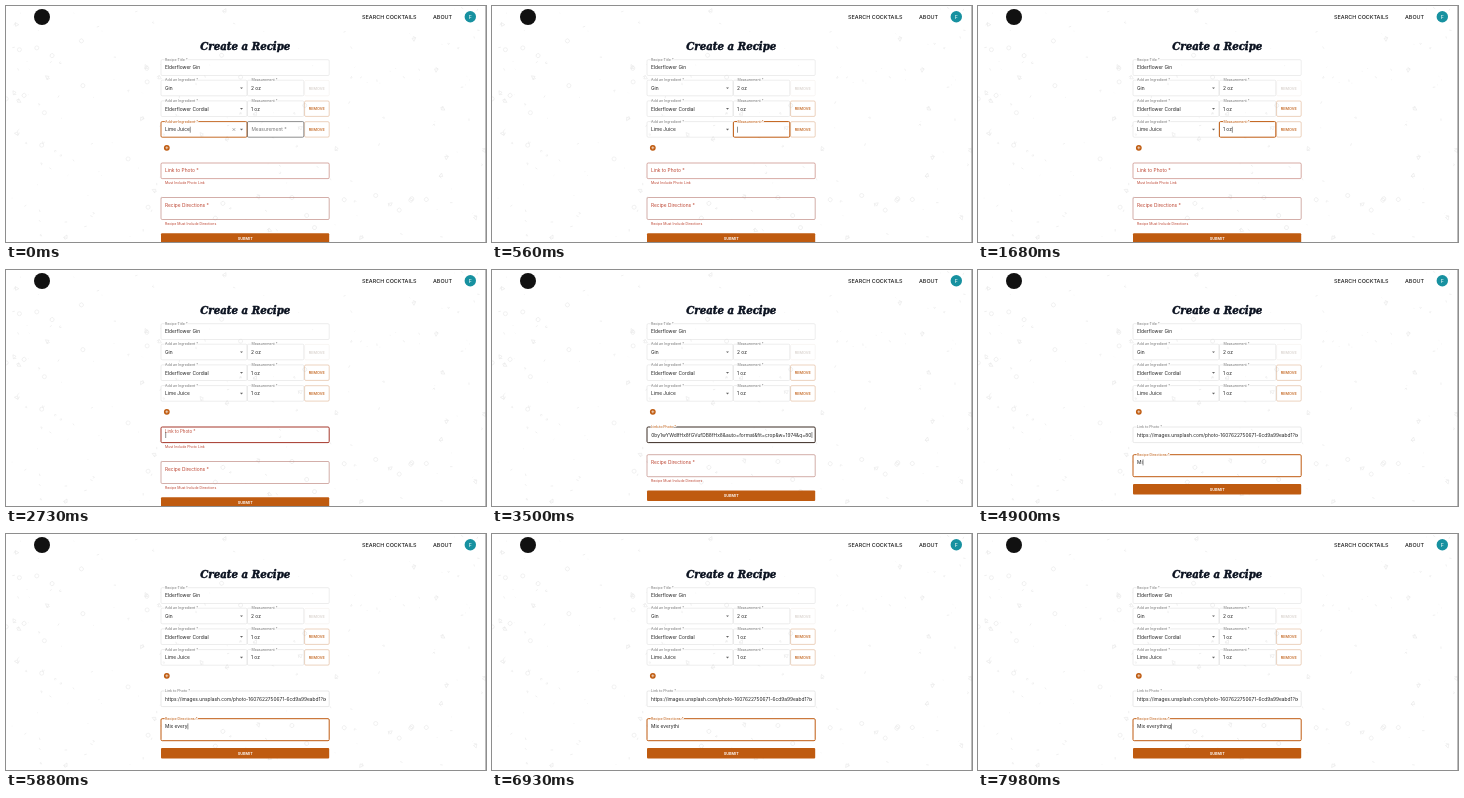
Recreate the animation shown at these times as an HTML page. Size 480x236 px, loop 8000 ms.

```html
<!DOCTYPE html>
<html lang="en">
<head>
<meta charset="utf-8">
<title>Create a Recipe</title>
<style>
  html, body { margin: 0; width: 100%; height: 100%; overflow: hidden; background: #fff; }
  svg { display: block; width: 100vw; height: 100vh; }
  text { font-family: Inter, "Open Sans", sans-serif; white-space: pre; }
  .heading { font-family: "DejaVu Serif", "Noto Serif", serif; font-weight: bold; font-style: italic; }
</style>
</head>
<body>
<svg viewBox="0 0 480 236" xmlns="http://www.w3.org/2000/svg">
  <defs><clipPath id="linkClip"><rect x="159" y="158" width="161" height="14"/></clipPath></defs>
  <g id="backdrop"></g>
  <g id="page"></g>
  <g id="form"></g>
</svg>
<script>
const LOOP = 8000;
const ORANGE = '#bf5b10', RED = '#bd4633', INK = '#222', GREY = '#777', LINE = '#dadada';
const BODY = 4.85, SMALL = 3.6;

const URL_START = 'https://images.unsplash.com/photo-1607622750671-6cd9a99eabd1?ixlib=rb';
const URL_END = 'MHxwaG90by1wYWdlfHx8fGVufDB8fHx8&auto=format&fit=crop&w=1974&q=80';

// When each field takes the focus, and what has been typed by when.
const FOCUS = { measure: 140, link: 2650, directions: 4040 };
const PASTE = 3500;
const MEASURE = [[1050, '1'], [1190, '1 '], [1400, '1 o'], [1540, '1 oz']];
const DIRECTIONS = [
  [4760, 'M'], [4870, 'Mi'], [4980, 'Mix'], [5080, 'Mix '], [5200, 'Mix e'],
  [5390, 'Mix ev'], [5530, 'Mix eve'], [5740, 'Mix ever'], [5880, 'Mix every'],
  [6090, 'Mix everyt'], [6230, 'Mix everyth'], [6370, 'Mix everythi'],
  [7210, 'Mix everythin'], [7980, 'Mix everything']
];
const INPUT_TIMES = [0, ...Object.values(FOCUS), PASTE,
  ...MEASURE.map(e => e[0]), ...DIRECTIONS.map(e => e[0])].sort((a, b) => a - b);

const $ = id => document.getElementById(id);
const pen = document.createElement('canvas').getContext('2d');
pen.font = '100px Inter, "Open Sans", sans-serif';
const widthOf = (s, size = BODY) => pen.measureText(s).width * size / 100;

const lastBefore = (list, t, none) => list.reduce((found, [at, v]) => at <= t ? v : found, none);
const esc = s => s.replace(/&/g, '&amp;');

function text(s, x, y, { size = BODY, fill = INK, anchor = 'start', weight = 400, extra = '' } = {}) {
  return `<text x="${x}" y="${(y + size * .36).toFixed(2)}" font-size="${size.toFixed(2)}" fill="${fill}" ` +
    `text-anchor="${anchor}" font-weight="${weight}" ${extra}>${esc(s)}</text>`;
}

function box(x, y, w, h, stroke = LINE, width = .5, fill = 'none') {
  return `<rect x="${x}" y="${y}" width="${w}" height="${h}" rx="1.2" fill="${fill}" stroke="${stroke}" stroke-width="${width}"/>`;
}

// Floating label: raised 0 rests inside the field, 1 sits on its top border.
function label(s, x, top, raised = 1, fill = GREY) {
  const size = BODY + (SMALL - BODY) * raised;
  const gap = raised > .3 ? 'stroke="#fff" stroke-width="1.4" paint-order="stroke"' : '';
  return text(s, x, top + 7.6 - 8 * raised, { size, fill, extra: gap });
}

const arrow = y => `<path d="M234 ${y - .8}h3l-1.5 1.7z" fill="#666"/>`;
const caret = (x, y) => `<path d="M${(x + .5).toFixed(2)} ${y - 3}v6" stroke="${INK}" stroke-width=".5"/>`;

function ingredient(name, top, focused) {
  return box(155, top, 86, 15.6, focused ? ORANGE : LINE, focused ? .9 : .5) +
    label('Add an Ingredient *', 159, top, 1, focused ? ORANGE : GREY) +
    text(name, 159, top + 8.1) + arrow(top + 8);
}

function measurement(amount, top, { stroke = LINE, width = .5, raised = 1, fill = GREY } = {}) {
  return box(241.4, top, 56.4, 15.6, stroke, width) +
    label('Measurement *', 245.4, top, raised, fill) + text(amount, 245, top + 8.1);
}

function removeButton(top, disabled) {
  return box(298.6, top, 24.6, 15.4, disabled ? '#f0ece9' : '#d9a47c', .5) +
    text('REMOVE', 310.8, top + 8, { size: 3.85, fill: disabled ? '#d6cfca' : ORANGE, anchor: 'middle', weight: 500 });
}

function drawBackdrop() {
  let seed = 41;
  const rnd = () => (seed = seed * 16807 % 2147483647) / 2147483647;
  const marks = [
    'm-2 0a2 2 0 1 0 4 0a2 2 0 1 0 -4 0', 'm-2-2h4l-2 3zv3', 'm0 0l1.5 2',
    'm0 0h.6', 'm-1 1q1-3 2 0', 'm0 0v.6', 'm0 0l2-1'
  ];
  let out = '';
  for (let i = 0; i < 190; i++) {
    const x = rnd() * 478, y = rnd() * 236, turn = rnd() * 360;
    out += `<path transform="translate(${x.toFixed(1)} ${y.toFixed(1)}) rotate(${turn | 0})" d="M0 0${marks[i % marks.length]}"/>`;
  }
  $('backdrop').innerHTML = `<g fill="none" stroke="#e9e9e9" stroke-width=".6">${out}</g>`;
}

function drawPage() {
  $('page').innerHTML =
    '<circle cx="36" cy="11" r="8" fill="#111"/>' +
    text('SEARCH COCKTAILS', 356, 10.7, { size: 5.45, weight: 500 }) +
    text('ABOUT', 427, 10.7, { size: 5.45, weight: 500 }) +
    '<circle cx="464.3" cy="10.7" r="5.7" fill="#1791a0"/>' +
    text('F', 464.3, 10.7, { size: 5.2, fill: '#fff', anchor: 'middle' }) +
    '<path d="M479.7 0v236" stroke="#777" stroke-width=".6"/>' +
    '<text class="heading" x="239.3" y="43.6" font-size="10.2" text-anchor="middle" fill="#0b1220" stroke="#0b1220" stroke-width=".45">Create a Recipe</text>' +
    box(155, 53.7, 168.2, 15.8) + label('Recipe Title *', 159, 53.7) + text('Elderflower Gin', 159, 61.7) +
    ingredient('Gin', 74.2) + measurement('2 oz', 74.2) + removeButton(74.4, true) +
    ingredient('Elderflower Cordial', 94.9) + measurement('1 oz', 94.9) + removeButton(95) +
    removeButton(115.7) +
    `<circle cx="160.8" cy="141.8" r="2.9" fill="${ORANGE}"/>` +
    '<path d="M159.3 141.8h3m-1.5-1.5v3" stroke="#fff" stroke-width=".6"/>';
}

function limeRow(t, blink) {
  const top = 115.6, active = t < FOCUS.measure;
  const amount = lastBefore(MEASURE, t, '');
  const measuring = !active && t < FOCUS.link;
  const style = active ? { stroke: '#444', width: .6 }
    : measuring ? { stroke: ORANGE, width: 1, fill: ORANGE } : {};
  style.raised = ease(t, FOCUS.measure);
  let out = ingredient('Lime Juice', top, active) + measurement(amount, top, style);
  if (active) {
    out += '<path d="M226.6 122.2l2.6 2.6m0-2.6l-2.6 2.6" stroke="#666" stroke-width=".5"/>';
    if (blink) out += caret(159 + widthOf('Lime Juice'), top + 8.1);
  }
  if (measuring && blink) out += caret(245 + widthOf(amount), top + 8.1);
  return out;
}

function linkField(t, blink) {
  const top = 157, pasted = t >= PASTE, done = t >= FOCUS.directions;
  const active = t >= FOCUS.link && !done;
  const tint = !pasted ? RED : active ? ORANGE : GREY;
  const stroke = !pasted ? (active ? '#a5372b' : '#bd7268')
    : done ? LINE : t < PASTE + 70 ? '#3b2c24' : ORANGE;
  let out = box(155, top, 168.2, 15.6, stroke, active ? 1 : .6) +
    label('Link to Photo *', 159, top, ease(t, FOCUS.link), tint);
  if (!pasted) out += text('Must Include Photo Link', 159, 176.8, { size: 3.5, fill: RED });
  else out += '<g clip-path="url(#linkClip)">' + (done
    ? text(URL_START, 159, 165)
    : text(URL_END, 319.4, 165, { anchor: 'end' })) + '</g>';
  if (active && blink) out += caret(pasted ? 319.4 : 159.2, 165);
  return out;
}

function directionsField(t, blink) {
  const top = t < PASTE ? 191.5 : 184.7;
  const typed = lastBefore(DIRECTIONS, t, '');
  const active = t >= FOCUS.directions;
  const stroke = typed ? ORANGE : active ? '#b0463b' : '#b5786f';
  let out = box(155, top, 168.2, 22, stroke, active ? 1 : .6) +
    label('Recipe Directions *', 159, top, ease(t, FOCUS.directions), typed ? ORANGE : RED) +
    text(typed, 159, top + 7.7);
  if (!typed) out += text('Recipe Must Include Directions', 159, top + 25.8, { size: 3.5, fill: RED });
  if (active && blink) out += caret(159 + widthOf(typed), top + 7.7);
  const submitTop = top + (typed ? 29.3 : 35.8);
  return out + `<rect x="155" y="${submitTop}" width="168.2" height="10.6" rx="1" fill="${ORANGE}"/>` +
    text('SUBMIT', 239.2, submitTop + 5.2, { size: 3.85, fill: '#fff', anchor: 'middle', weight: 600 });
}

function ease(t, start) {
  const p = Math.min(1, Math.max(0, (t - start) / 200));
  return p * p * (3 - 2 * p);
}

let shown = '';
function render(t) {
  const lastInput = INPUT_TIMES.reduce((found, at) => at <= t ? at : found, 0);
  const blink = (t - lastInput) % 1000 < 500;
  const markup = limeRow(t, blink) + linkField(t, blink) + directionsField(t, blink);
  if (markup !== shown) $('form').innerHTML = shown = markup;
}

drawBackdrop();
drawPage();
render(0);
const began = performance.now();
(function tick() {
  render((performance.now() - began) % LOOP);
  requestAnimationFrame(tick);
})();
</script>
</body>
</html>
```
